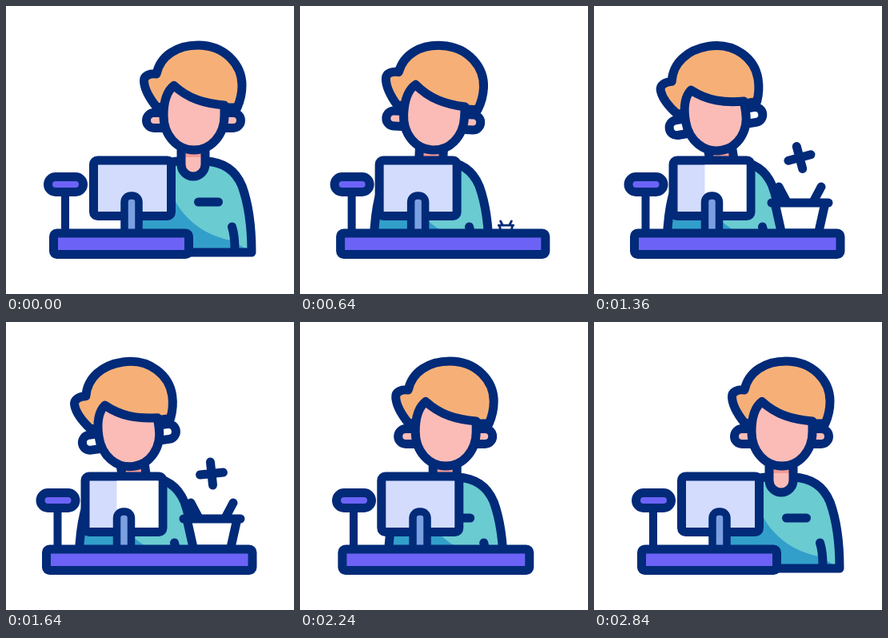
Animation, 360 px wide and 360 px high, one loop 3 s. Source, as an HTML page with a canvas:

```html
<!DOCTYPE html>
<html lang="en">
<head>
<meta charset="utf-8">
<title>Cashier at the counter</title>
<style>
html, body { margin: 0; width: 100%; height: 100%; overflow: hidden; background: #fff; }
canvas { display: block; width: 360px; height: 360px; }
</style>
</head>
<body>
<canvas id="stage" width="360" height="360"></canvas>
<script>
const ctx = document.getElementById('stage').getContext('2d');
const LOOP = 3000, STEP = 40;
const color = {
  line: '#012a78', hair: '#f6b077', skin: '#fbbcb7', neckShade: '#f49a94',
  shirt: '#6acbd1', shirtShade: '#329fca', screen: '#d3dcfd',
  purple: '#6c63f6', stand: '#7ba0e2'
};

const shape = {
  body: new Path2D('M163 308C163 270 167 235 180 212C188 199 203 194 219 194H249C274 195 288 208 295 225C303 247 307 275 307 308Z'),
  shade: new Path2D('M150 225H205L207 232C213 255 240 286 282 293L307 308H150Z'),
  neck: new Path2D('M219 174V198A15 15 0 0 0 249 198V174'),
  sleeve: new Path2D('M282.500 276Q286 287 286 304'),
  pocket: new Path2D('M240.500 245H265.500'),
  leftEar: new Path2D('M198 133.500H185A8.500 8.500 0 0 0 185 152.500H200Z'),
  rightEar: new Path2D('M272 133.500H284A8.500 8.500 0 0 1 284 152.500H270Z'),
  hair: new Path2D('M188 126C180 116 173 105 172.500 94C172 87 180 84 188 85C193 62 214 49 240 49C274 49 295 74 295 99C295 110 293 118 289 127H196Z'),
  face: new Path2D('M210 99.500C200 107 197 120 197 137C197 162 214 180 235 180C256 180 273 162 273 137V124C248 122 228 116 210 99.500Z'),
  stand: new Path2D('M148 286V245A8 8 0 0 1 156 237H158A8 8 0 0 1 166 245V286'),
  bowl: new Path2D('M222 246H293M289 246L280.500 284H234.500L226 246'),
  sticks: new Path2D('M231 226L240 243M284 226L275 243'),
  plus: new Path2D('M-14.500 0H14.500M0 -14.500V14.500')
};

const mix = (a, b, u) => a + (b - a) * u;
function ease(t, start, end) {
  const u = Math.min(1, Math.max(0, (t - start) / (end - start)));
  return u * u * (3 - 2 * u);
}

// Eased interpolation through [time, value] keys.
function track(t, keys) {
  let value = keys[0][1];
  for (let i = 1; i < keys.length; i++) {
    const [from, a] = keys[i - 1], [to, b] = keys[i];
    if (t >= from) value = mix(a, b, ease(t, from, to));
  }
  return value;
}

function paint(path, fill, width = 11) {
  if (fill) {
    ctx.fillStyle = fill;
    ctx.fill(path);
  }
  ctx.lineWidth = width;
  ctx.stroke(path);
}

function box(x, y, w, h, r, fill) {
  const path = new Path2D();
  path.roundRect(x, y, w, h, r);
  paint(path, fill);
}

function place(x, y, draw) {
  ctx.save();
  ctx.translate(x, y);
  draw();
  ctx.restore();
}

// Head and neck tilt together around the collar.
function drawHead(tilt, earFill) {
  place(236, 205, () => {
    ctx.rotate(tilt * Math.PI / 180);
    ctx.translate(-236, -205);
    ctx.fillStyle = color.skin;
    ctx.fill(shape.neck);
    ctx.fillStyle = color.neckShade;
    ctx.fillRect(219, 176, 30, 13);
    paint(shape.neck);
    paint(shape.leftEar, earFill);
    paint(shape.rightEar, earFill);
    paint(shape.hair, color.hair);
    paint(shape.face, color.skin);
  });
}

function drawPerson(tilt, earFill) {
  ctx.fillStyle = color.shirt;
  ctx.fill(shape.body);
  ctx.save();
  ctx.clip(shape.body);
  ctx.fillStyle = color.shirtShade;
  ctx.fill(shape.shade);
  ctx.restore();
  paint(shape.body);
  paint(shape.sleeve);
  paint(shape.pocket);
  drawHead(tilt, earFill);
}

function drawMonitor(glare) {
  box(109.5, 193, 97, 69.5, 5, color.screen);
  if (glare) {
    ctx.fillStyle = '#fff';
    ctx.fillRect(149, 198.5, 52, 58.5);
  }
}

function drawScanner() {
  ctx.lineWidth = 10;
  ctx.beginPath();
  ctx.moveTo(74, 236);
  ctx.lineTo(74, 284);
  ctx.stroke();
  box(52.5, 213.5, 44, 19, 9.5, color.purple);
}

function drawBowl(scale) {
  if (scale <= 0) return;
  place(257.5, 284, () => {
    ctx.scale(scale, scale);
    ctx.translate(-257.5, -284);
    paint(shape.sticks);
    paint(shape.bowl, '#fff');
  });
}

function drawPlus(scale, turn) {
  if (scale <= 0) return;
  place(257, 189.5, () => {
    ctx.rotate(turn * Math.PI / 180);
    ctx.scale(scale, scale);
    paint(shape.plus);
  });
}

function render(t) {
  const slide = track(t, [[120, 0], [680, 1], [2040, 1], [2630, 0]]);
  const tilt = track(t, [[480, 0], [960, 11.5], [1440, -11], [2020, 0]]);
  const turn = track(t, [[960, 0], [1380, -15], [1840, 0]]);
  const bowl = track(t, [[560, 0], [800, 1], [2040, 1], [2240, 0]]);
  const plus = track(t, [[680, 0], [880, 1], [2000, 1], [2160, 0]]);
  const glare = t >= 760 && t < 2120;
  const earFill = t >= 1200 && t < 2000 ? '#fff' : color.skin;

  ctx.fillStyle = '#fff';
  ctx.fillRect(0, 0, 360, 360);
  ctx.strokeStyle = color.line;
  ctx.lineCap = ctx.lineJoin = 'round';

  place(-72 * slide, 0, () => drawPerson(tilt, earFill));
  place(-10.5 * slide, 0, () => drawMonitor(glare));
  place(-9.5 * slide, 0, () => {
    drawScanner();
    paint(shape.stand, color.stand, 9.5);
  });
  drawBowl(bowl);
  drawPlus(plus, turn);

  const left = mix(59.5, 50.5, slide), right = mix(228.5, 308, slide);
  box(left, 284, right - left, 26.5, 4, color.purple);
}

const began = performance.now();
function tick() {
  const t = (performance.now() - began) % LOOP;
  render(Math.floor(t / STEP) * STEP);
  requestAnimationFrame(tick);
}
tick();
</script>
</body>
</html>
```
